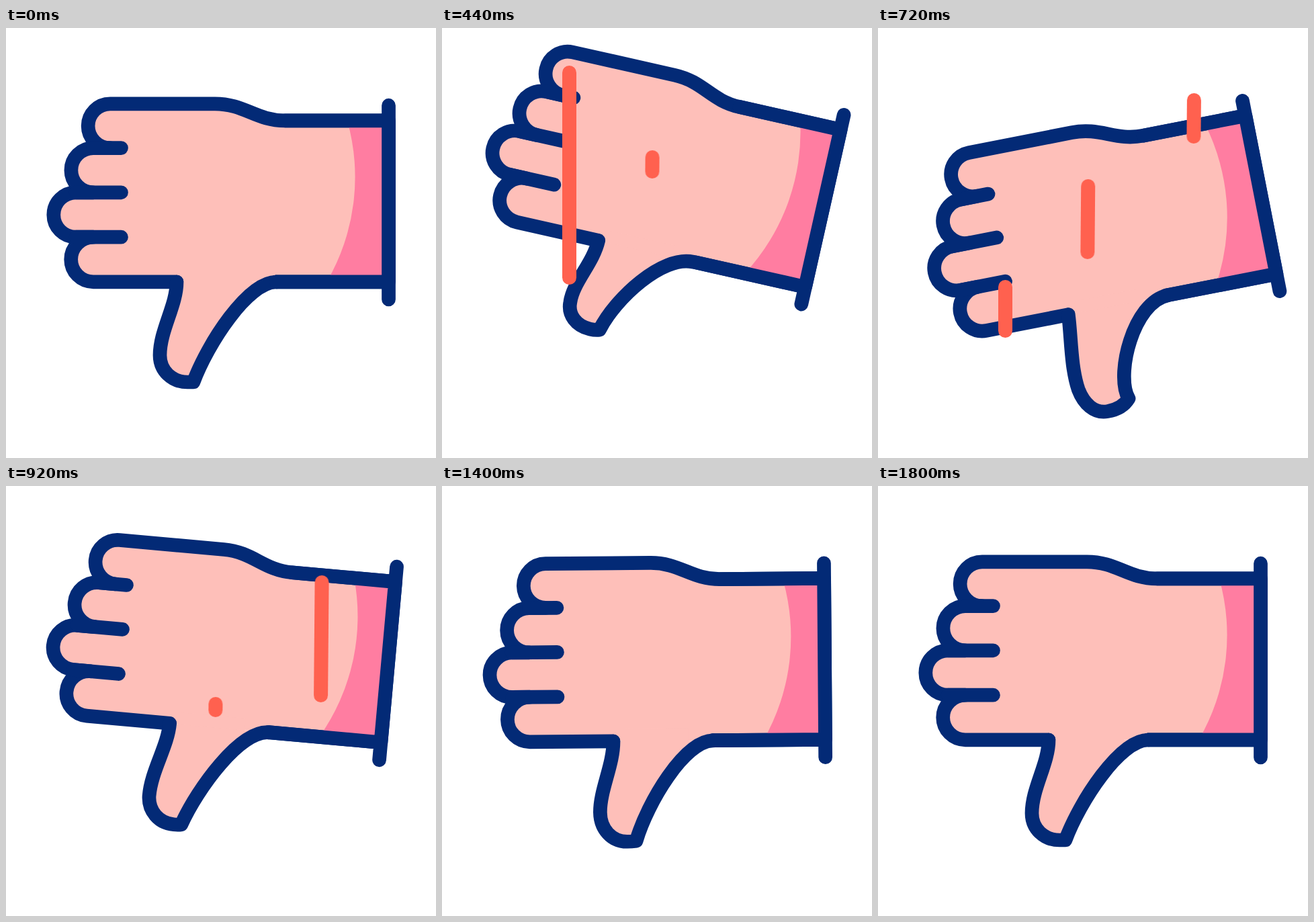
Recreate the animation shown at these times as an HTML page. Size 640 px wide and 640 px high, loop 2 s.

```html
<!DOCTYPE html>
<html lang="en">
<head>
<meta charset="utf-8">
<title>Thumbs down</title>
<style>
  /* A registered angle keeps the outline drawn as vectors at every step. */
  @property --tilt { syntax: "<angle>"; inherits: false; initial-value: 0deg; }
  :root {
    --ink: #032a76;
    --skin: #febfb9;
    --cuff: #ff7da1;
    --streak: #ff614f;
    --line: 20.7px;
    --sway: cubic-bezier(.37, 0, .63, 1);
    --sweep: cubic-bezier(.333, 0, .667, 1);
  }
  html, body { margin: 0; width: 100%; height: 100%; overflow: hidden; background: #fff; }
  .stage { position: relative; width: 640px; height: 640px; overflow: hidden; }
  svg { display: block; }

  .hand {
    transform-origin: 520.4px 251.2px;
    transform: rotate(var(--tilt));
    animation: swing 2s var(--sway) infinite;
  }
  .outline {
    fill: var(--skin);
    stroke: var(--ink);
    stroke-width: var(--line);
    stroke-linecap: round;
    stroke-linejoin: round;
  }
  .thumb { animation: bend 2s var(--sway) infinite; }

  @keyframes swing {
    0%, 4% { --tilt: 0deg; }
    20% { --tilt: 14deg; }
    34% { --tilt: -12deg; }
    48% { --tilt: 6deg; }
    62% { --tilt: -6deg; }
    76% { --tilt: 3deg; }
    90%, 100% { --tilt: 0deg; }
  }
  @keyframes bend {
    0%, 4%, 76%, 100% { d: path("M254 378C254 413 229 450 229 487C229 510 247 527 270 527C273 527 276 527 279 527C300 470 360 378 402 378"); }
    20% { d: path("M254 378C254 413 230 446 232.5 476C233 495 249 508 270 508C274 508 279 507.5 283 506.5C297 455 352 378 398 378"); }
    34% { d: path("M254 378C252 410 243 455 248 490C252 512 264 530 284 530.5C301 531 312 526 320 517C305 480 352 378 405 378"); }
    48% { d: path("M254 378C254 413 232.5 450 232.5 488C233 510 250 527 273 527C277 527 280 527 283 526.5C304 470 360 378 402 378"); }
    62% { d: path("M254 378C254 413 241 450 241 478C241 506 256 528 280 528C287 528 294 527 300 525.5C310 470 360 378 403 378"); }
  }

  /* Each streak grows downwards, then its top catches up with its bottom. */
  .track { position: absolute; width: var(--line); }
  .streak {
    position: absolute;
    left: 0;
    right: 0;
    top: 0;
    bottom: calc(100% - var(--line));
    border-radius: 11px;
    background: var(--streak);
    opacity: 0;
    animation:
      grow 2s var(--sweep) var(--grow) infinite,
      shrink 2s var(--sweep) var(--shrink) infinite,
      show 2s step-end var(--grow) infinite;
  }
  @keyframes grow {
    0% { bottom: calc(100% - var(--line)); }
    14%, 100% { bottom: 0; }
  }
  @keyframes shrink {
    0% { top: 0; }
    21%, 30% { top: calc(100% - var(--line)); }
    30.01%, 100% { top: 0; }
  }
  @keyframes show {
    0% { opacity: 1; }
    30%, 100% { opacity: 0; }
  }
  .left { left: 179.2px; top: 50px; height: 411px; --grow: 242ms; --shrink: 410ms; }
  .middle { left: 302.4px; top: 181.6px; height: 161.7px; transform: rotate(.5deg); --grow: 373ms; --shrink: 566ms; }
  .right { left: 458.8px; top: 96.9px; height: 224.5px; transform: rotate(.5deg); --grow: 626ms; --shrink: 809ms; }
</style>
</head>
<body>
<div class="stage">
  <svg width="640" height="640" viewBox="0 0 640 640">
    <g class="hand">
      <path class="outline" d="M254 377.8H130A33.3 33.3 0 0 1 130 311.2H104A33.2 33.2 0 0 1 104 244.8H130A33.1 33.1 0 0 1 130 178.6H155A32.9 32.9 0 0 1 155 112.8H311C355 112.8 372 137.8 415 137.8H569.5V377.8H402"/>
      <rect x="266" y="360" width="100" height="22" fill="var(--skin)"/>
      <path class="outline thumb" d="M254 378C254 413 229 450 229 487C229 510 247 527 270 527C273 527 276 527 279 527C300 470 360 378 402 378"/>
      <path fill="var(--cuff)" d="M508 138A310 310 0 0 1 477.4 378H569.5V138Z"/>
      <path class="outline" style="fill: none" d="M130 178.6H171.5M104 244.8H171.5M104 311.2H171.5M415 137.8H569.5M402 377.8H569.5M569.5 115.2V404"/>
    </g>
  </svg>
  <div class="track left"><div class="streak"></div></div>
  <div class="track middle"><div class="streak"></div></div>
  <div class="track right"><div class="streak"></div></div>
</div>
</body>
</html>
```
